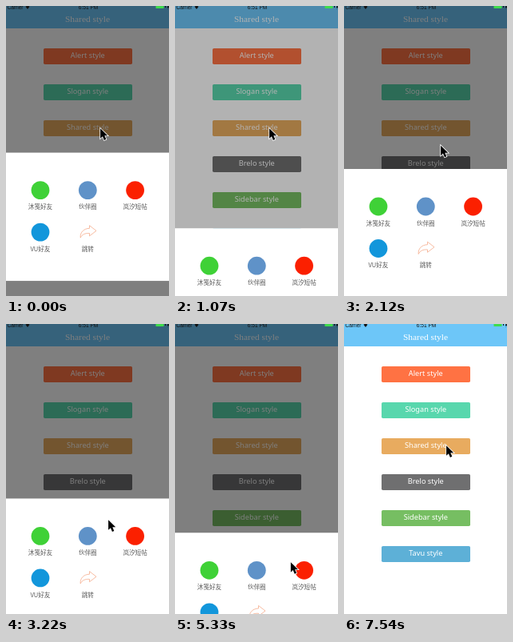
Animation, 204 px wide and 363 px high, one loop 8000 ms. Source, as an HTML page:

```html
<!DOCTYPE html>
<html lang="en">
<head>
<meta charset="utf-8">
<title>Popup styles</title>
<style>
  html, body { margin: 0; height: 100%; overflow: hidden; background: #fff; }
  svg { display: block; width: 100vw; height: 100vh; }
  text { text-anchor: middle; }
  .status { font: 6.6px "Liberation Sans", sans-serif; fill: #111; }
  .title { font: 11.4px "Liberation Serif", serif; fill: #fff; }
  .button { font: 9.2px "Noto Sans", sans-serif; fill: #fff; }
  .label { font: 7.6px "Noto Sans CJK SC", "Noto Sans CJK", sans-serif; fill: #5c5c5c; }
</style>
</head>
<body>
<svg viewBox="0 0 204 363">
  <rect width="204" height="363" fill="#fff"/>
  <rect width="204" height="28" fill="#6dc6f8"/>
  <text class="title" x="102" y="20">Shared style</text>
  <g id="buttons"></g>
  <rect id="dim" width="204" height="363"/>
  <g class="status">
    <text x="11.5" y="4">Carrier</text>
    <path d="M24.5 .8Q27 -1 29.5 .8L27 4Z"/>
    <text x="103" y="4">6:51 PM</text>
    <rect x="187.5" y="-3" width="10" height="6" fill="#3fdc4c"/>
    <path d="M199 0h1v2h-1zM203.5 -1l-2 3h1.5l-1 2.5 2-3z"/>
  </g>
  <g id="sheet">
    <rect width="204" height="160.5" fill="#fff"/>
    <path d="M104.5 91.2L113 97.8L104.5 104.3V101C99 100.5 95 102.5 93.2 106.5C92.5 100 97 95 104.5 94.7Z"
      fill="none" stroke="#f5ab8b" stroke-width=".8" stroke-linejoin="round"/>
  </g>
  <path id="cursor" d="M0 0V14.2L3.2 11.2L5.5 16.6L8.2 15.4L5.9 10.2H10.4Z"
    stroke="#fff" stroke-width="1.8" paint-order="stroke"/>
</svg>
<script>
const LOOP = 8000, SHEET_TOP = 203.4, SHEET_HEIGHT = 161, DRAG_SLOP = 6;
const $ = id => document.getElementById(id);

function add(parent, tag, attrs, text = '') {
  const node = document.createElementNS('http://www.w3.org/2000/svg', tag);
  for (const key in attrs) node.setAttribute(key, attrs[key]);
  node.textContent = text;
  parent.append(node);
}

[['Alert', '#ff7243'], ['Slogan', '#58d7ad'], ['Shared', '#e8ab5f'],
 ['Brelo', '#6f6f70'], ['Sidebar', '#76be62'], ['Tavu', '#5db0d7']].forEach(([name, fill], i) => {
  const y = 53 + 45 * i;
  add($('buttons'), 'rect', { x: 47, y, width: 111, height: 20, rx: 1.8, fill });
  add($('buttons'), 'text', { class: 'button', x: 102.3, y: y + 12.4 }, name + ' style');
});

[['沐笺好友', '#3fd137'], ['伙伴圈', '#5f92c8'], ['岚汐短帖', '#fb2000'],
 ['VU好友', '#1296db'], ['跳转']].forEach(([name, fill], i) => {
  const x = 43 + 59.3 * (i % 3), y = 47 + 52.5 * Math.floor(i / 3);
  if (fill) add($('sheet'), 'circle', { cx: x, cy: y, r: 11.4, fill });
  add($('sheet'), 'text', { class: 'label', x, y: y + 23.6 }, name);
});

// Progress from 0 to 1 over a time span
const ramp = (t, start, duration) => Math.min(1, Math.max(0, (t - start) / duration));

// Remaining displacement of an underdamped spring
function spring(ms) {
  const s = ms / 1000, decay = 9, freq = 13.5;
  return Math.exp(-decay * s) * (Math.cos(freq * s) + decay / freq * Math.sin(freq * s));
}

function drop(from, ms) {
  const k = ramp(ms, 0, 170);
  return from + (SHEET_HEIGHT - from) * k * k * (3 - 2 * k);
}

const moves = [
  { start: 1850, end: 2750, x: 127, y: 223 },
  { start: 3070, end: 3450, x: 127, y: 276 },
  { start: 3870, end: 4450, x: 156, y: 284 },
  { start: 4450, end: 4650, x: 152, y: 233 },
  { start: 4960, end: 5500, x: 140, y: 326 },
  { start: 5840, end: 7300, x: 127, y: 151 }
];

function cursorAt(t) {
  let x = 117, y = 152;
  for (const move of moves) {
    const k = ramp(t, move.start, move.end - move.start);
    x += (move.x - x) * k;
    y += (move.y - y) * k;
  }
  return { x, y };
}

// While held, the sheet follows the cursor from where it was grabbed
const dragged = (t, grabTime) =>
  Math.max(0, cursorAt(t).y - cursorAt(grabTime).y - DRAG_SLOP);

function sheetOffset(t) {
  if (t < 990) return SHEET_HEIGHT * spring(t + 233);
  if (t < 1720) return drop(0, t - 990);
  if (t < 3070) return SHEET_HEIGHT * spring(t - 1720);
  if (t < 3860) return dragged(t, 3070);
  if (t < 4960) return dragged(3860, 3070) * spring(t - 3860);
  if (t < 5840) return dragged(t, 4960);
  return drop(dragged(5840, 4960), t - 5840);
}

function draw() {
  const t = performance.now() % LOOP;
  const { x, y } = cursorAt(t);
  const shade = 1 - ramp(t, 1000, 180) + ramp(t, 1684, 200) - ramp(t, 5855, 260);
  $('dim').setAttribute('opacity', shade / 2);
  $('sheet').setAttribute('transform', `translate(0 ${SHEET_TOP + sheetOffset(t)})`);
  $('cursor').setAttribute('transform', `translate(${x + 1.1} ${y + 1.3}) scale(.88)`);
  requestAnimationFrame(draw);
}
draw();
</script>
</body>
</html>
```
